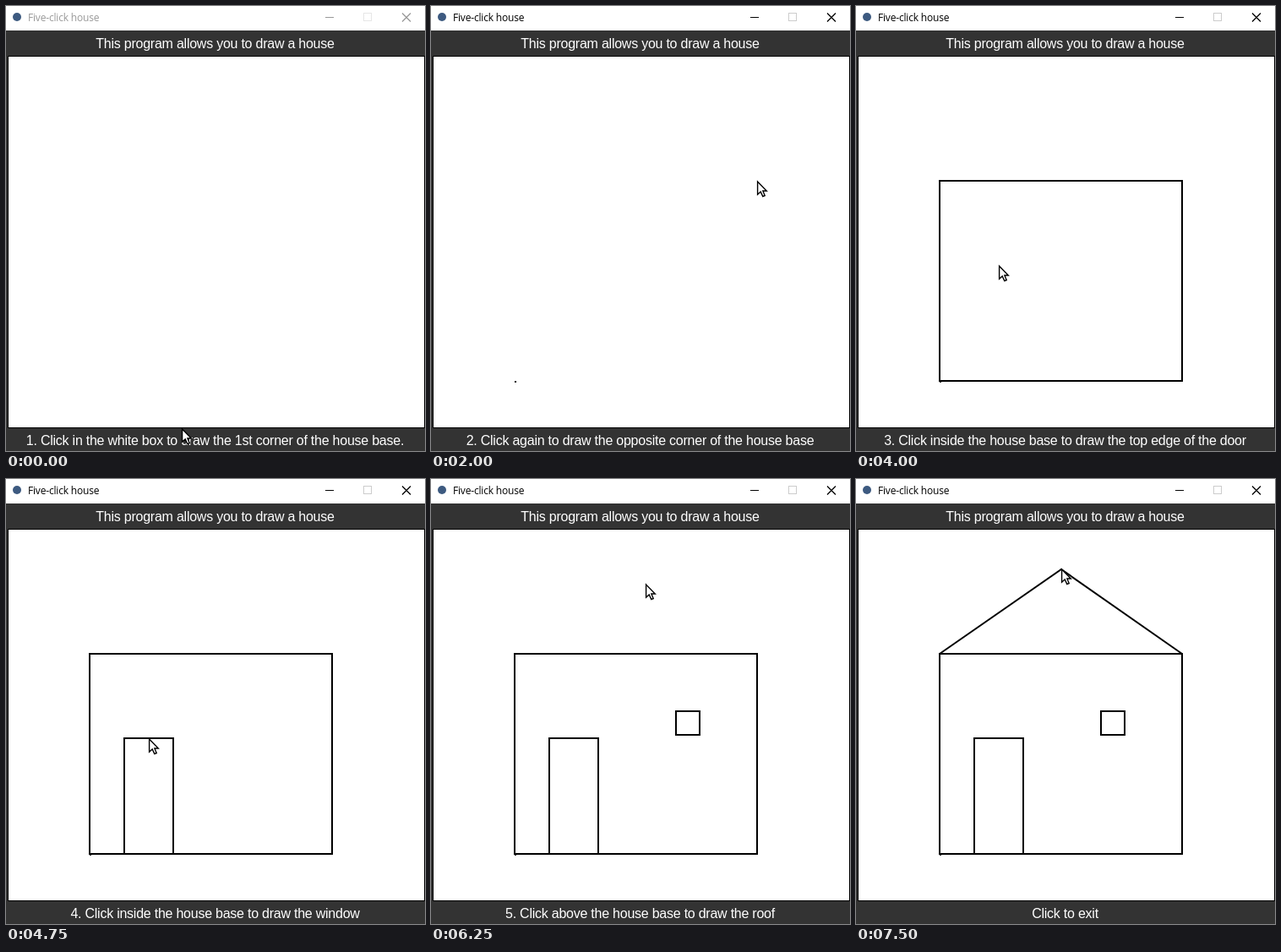
Animation of 496 by 527 pixels, one loop 8 s. Source, as an HTML page:

```html
<!DOCTYPE html>
<html lang="en">
<head>
<meta charset="utf-8">
<title>Five-click house</title>
<style>
  html, body { margin: 0; width: 100%; height: 100%; overflow: hidden; background: #333; }
  svg { display: block; }
  .label { font: 16px "Liberation Sans", Arial, sans-serif; letter-spacing: -.015em; fill: #fff; text-anchor: middle; }
  .title { font: 12px "Open Sans", "Noto Sans", sans-serif; letter-spacing: -.015em; }
  #house { fill: none; stroke: #000; stroke-width: 2; }
</style>
</head>
<body>
<svg width="496" height="527" viewBox="0 0 496 527">
  <rect width="496" height="527" fill="#333"/>
  <rect width="496" height="29" fill="#fff"/>
  <circle cx="13" cy="13" r="5" fill="#3d5a80"/>
  <g id="chrome">
    <text class="title" x="26" y="18" fill="currentColor">Five-click house</text>
    <path d="M378 13.5h10" stroke="currentColor"/>
    <path d="M469 8.5l10 10m0 -10l-10 10" stroke="currentColor" stroke-width="1.3"/>
  </g>
  <rect id="maximise" x="423.5" y="8.5" width="9" height="9" fill="none"/>
  <text class="label" x="247.5" y="50">This program allows you to draw a house</text>
  <rect x="2.5" y="59.5" width="493" height="440" fill="#fff" stroke="#000"/>
  <path id="house"/>
  <text class="label" id="prompt" x="247.5" y="520"></text>
  <path id="cursor" d="M.6 1V16.2L4.2 12.9L6.8 18.5L9.2 17.5L6.9 12H11.3Z" fill="#fff" stroke="#000" stroke-width="1.4"/>
</svg>
<script>
const LOOP = 8000, STEP = 250;

// The five clicked points; everything else is measured from them
const base = { x: 99, y: 444 }, corner = { x: 386, y: 207 };
const door = { x: 169, y: 307 }, pane = { x: 304, y: 289 }, apex = { x: 243, y: 106 };
const doorHalf = Math.round((corner.x - base.x) / 10);
const paneHalf = Math.floor(doorHalf / 2);

const box = (x0, y0, x1, y1) => `M${x0} ${y0}H${x1}V${y1}H${x0}Z`;

// Each click adds a shape and sets the next prompt
const stages = [
  { at: 0, shape: "", prompt: "1. Click in the white box to draw the 1st corner of the house base." },
  { at: 1250, shape: `M${base.x} ${base.y + 1}h2`,
    prompt: "2. Click again to draw the opposite corner of the house base" },
  { at: 2250, shape: box(base.x, base.y, corner.x, corner.y),
    prompt: "3. Click inside the house base to draw the top edge of the door" },
  { at: 4750, shape: box(door.x - doorHalf, door.y, door.x + doorHalf, base.y),
    prompt: "4. Click inside the house base to draw the window" },
  { at: 5750, shape: box(pane.x - paneHalf, pane.y - paneHalf, pane.x + paneHalf, pane.y + paneHalf),
    prompt: "5. Click above the house base to draw the roof" },
  { at: 7500, shape: `M${base.x} ${corner.y}L${apex.x} ${apex.y + 1}L${corner.x} ${corner.y}`,
    prompt: "Click to exit" },
];

const moves = [
  { from: 0, to: 1000, ...base },
  { from: 1250, to: 2000, ...corner },
  { from: 2250, to: 3500, x: 180, y: 341 },
  { from: 3500, to: 4000, ...door },
  { from: 4750, to: 5500, ...pane },
  { from: 5500, to: 6250, x: 254, y: 124 },
  { from: 6250, to: 7250, ...apex },
];

const byId = id => document.getElementById(id);
const ease = k => k * k * (3 - 2 * k);

function cursorAt(t) {
  let x = 208, y = 500;
  for (const m of moves) {
    const k = ease(Math.min(1, Math.max(0, (t - m.from) / (m.to - m.from))));
    x += (m.x - x) * k;
    y += (m.y - y) * k;
  }
  return [Math.round(x), Math.round(y)];
}

function draw(now) {
  const t = Math.floor((now % LOOP) / STEP) * STEP;
  const reached = stages.filter(s => s.at <= t);
  const active = reached.length > 1;
  byId("chrome").style.color = active ? "#000" : "#999";
  byId("maximise").setAttribute("stroke", active ? "#ccc" : "#e6e6e6");
  byId("house").setAttribute("d", reached.map(s => s.shape).join(""));
  byId("prompt").textContent = reached.at(-1).prompt;
  byId("cursor").setAttribute("transform", `translate(${cursorAt(t)})`);
}

const start = performance.now();
function tick() {
  draw(performance.now() - start);
  requestAnimationFrame(tick);
}
tick();
</script>
</body>
</html>
```
